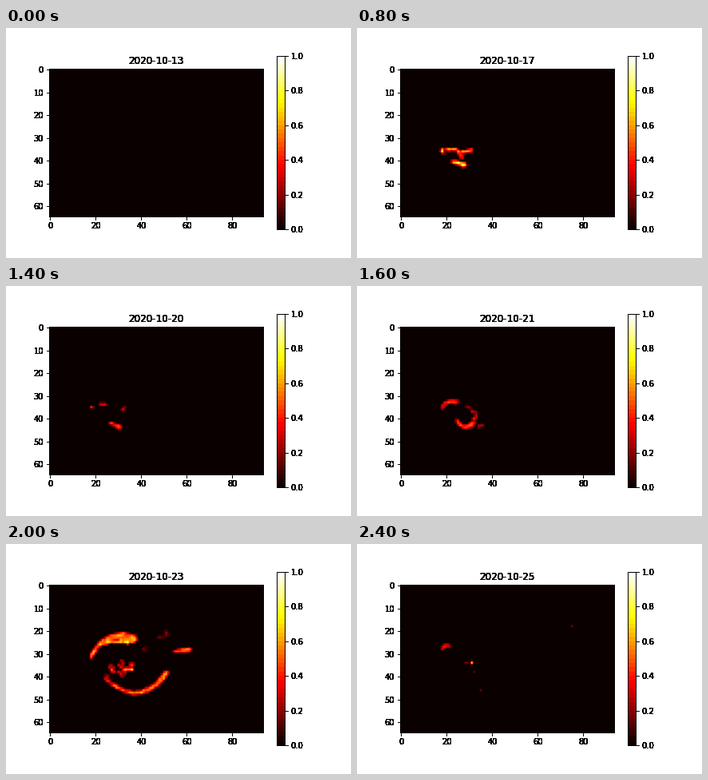
Write a matplotlib script that moves like this. It is 432 by 288 pixels and loops after 3.4 s.

```python
import numpy as np
import matplotlib.pyplot as plt
from matplotlib.animation import FuncAnimation

ROWS, COLS = 65, 94
FIRST, LAST = 13, 25
FRAMES, INTERVAL = 17, 200

yy, xx = np.mgrid[:ROWS, :COLS]
fire = {day: np.zeros((ROWS, COLS)) for day in range(FIRST, LAST + 1)}


def patchy(seed):
    """Cell noise, softened by its neighbours."""
    g = np.random.default_rng(seed).uniform(-1, 1, (ROWS, COLS))
    return 0.5 * (g + np.roll(g, 1, 0) + np.roll(g, 1, 1))


def burn(day, heat, start, end, half=0.6, tip=None, bend=0.0):
    """Add a ragged, curved stroke whose half width runs from half to tip."""
    (x0, y0), (x1, y1) = start, end
    tip = half if tip is None else tip
    cx = (x0 + x1) / 2 + bend * (y1 - y0)
    cy = (y0 + y1) / 2 - bend * (x1 - x0)
    gap = np.full((ROWS, COLS), np.inf)
    for t in np.linspace(0, 1, 40):
        a, b, c = (1 - t) ** 2, 2 * t * (1 - t), t * t
        dist = np.hypot(xx - a * x0 - b * cx - c * x1,
                        yy - a * y0 - b * cy - c * y1)
        gap = np.minimum(gap, dist - half - t * (tip - half))
    cover = np.clip(0.5 - gap + 0.35 * half * patchy(day), 0, 1)
    level = heat * cover * (1 + 0.25 * patchy(day + 100))
    fire[day] = np.maximum(fire[day], np.clip(level, 0, 1))


def sparks(day, count, center, spread, heat):
    """Scatter short seeded strokes around a point."""
    rng = np.random.default_rng(day)
    for _ in range(count):
        p = rng.normal(center, spread)
        burn(day, heat * rng.uniform(0.5, 1), p, p + rng.uniform(-2, 2, 2))


# first outbreak, cooling while it creeps east and south
for k in range(6):
    day = 15 + k
    heat = 1.05 - 0.12 * k
    east = 33 - 9 * np.exp(-0.7 * k)
    north = 36 - 0.45 * k
    burn(day, 1.1 * heat, (18, 36 - 0.2 * k), (18.4, 37.3 - 0.45 * k),
         0.9 - 0.1 * k)
    burn(day, 0.8 * heat, (18 + 0.8 * k, north), (24, north), 0.7)
    burn(day, 0.75 * heat, (east - 7 + 1.2 * k, 36.3), (east, 35.5))
    if k:
        burn(day, 1.1 * heat, (20 + 1.3 * k, 39.5 + 0.5 * k),
             (26 + 0.9 * k, 40.7 + 0.6 * k), 0.6, 1.0)
        burn(day, max(0, 1.2 - 0.25 * k) * heat, (25, 36), (26.5, 38.5), 0.7)

# burning rim: the west side climbs while both arcs stretch and shrink
for j, reach in enumerate((6, 10, 18, 9, 3)):
    day = 21 + j
    top = 35.5 - 1.9 * j
    heat = 0.36 + 0.012 * reach
    burn(day, heat, (18, top), (18 + reach, top - 0.45 * reach),
         0.6, 0.6 + 0.08 * reach, bend=0.45)
    if day < LAST:
        burn(day, heat, (24.5, 41), (22 + 1.6 * reach, 44 - 0.3 * reach),
             0.7, 1.1, bend=-0.55)
        sparks(day, reach // 2 + 2, (31, 37), (3, 3), heat)

# the big run to the north-east
burn(22, 0.5, (34, 26.5), (57, 26), 1.0, 2.6)
burn(22, 0.48, (57, 25.3), (63.5, 21.5), 2.2, 1.2)
burn(22, 0.75, (46, 28.5), (58, 28))
burn(22, 0.68, (33, 25.7), (42, 27.5))
burn(22, 0.42, (38, 29), (45, 30.5), 1.2)
burn(22, 0.48, (58, 28), (41, 40), 0.9, bend=0.1)
burn(22, 0.38, (37, 29), (35, 34), 0.8)
burn(22, 0.85, (34, 34), (34.5, 38), 1.2)

# break-up
burn(23, 0.72, (22, 26), (34, 25), 0.7, bend=0.1)
burn(23, 0.7, (32.5, 37), (36, 36.7), 0.7)
burn(23, 0.65, (54.5, 29), (61, 28.3), 0.4, 0.9)
sparks(23, 4, (51, 21.5), (1.5, 1.5), 0.3)
sparks(23, 2, (42, 27), (0.5, 1.5), 0.25)

# embers
burn(24, 0.25, (73.5, 18.5), (73.5, 18.5), 0.3)
burn(25, 0.8, (31, 33.8), (31, 34.2), 0.4)
burn(25, 0.2, (28, 34), (29, 34), 0.4)
for col, row in ((32, 38), (35, 46), (75, 18)):
    burn(25, 0.2, (col, row), (col, row), 0.3)


def harden(artist, times=20):
    """Repeat the drawing so that soft edges turn solid."""
    draw = artist.draw

    def repeat(renderer):
        for _ in range(times):
            draw(renderer)

    artist.draw = repeat


fig, ax = plt.subplots(figsize=(6, 4), dpi=72)
fig.subplots_adjust(bottom=0.125)
image = ax.imshow(fire[FIRST], cmap=plt.get_cmap('hot', 40), vmin=0, vmax=1)
bar = fig.colorbar(image)
title = ax.set_title('')
for part in (ax.xaxis, ax.yaxis, bar.ax.yaxis, title, bar.outline,
             *ax.spines.values()):
    harden(part)


def update(i):
    day = min(FIRST + i, LAST)
    image.set_data(fire[day])
    title.set_text(f'2020-10-{day}')
    return image, title


anim = FuncAnimation(fig, update, frames=FRAMES, interval=INTERVAL,
                     repeat=True, repeat_delay=0)
plt.show()
```
